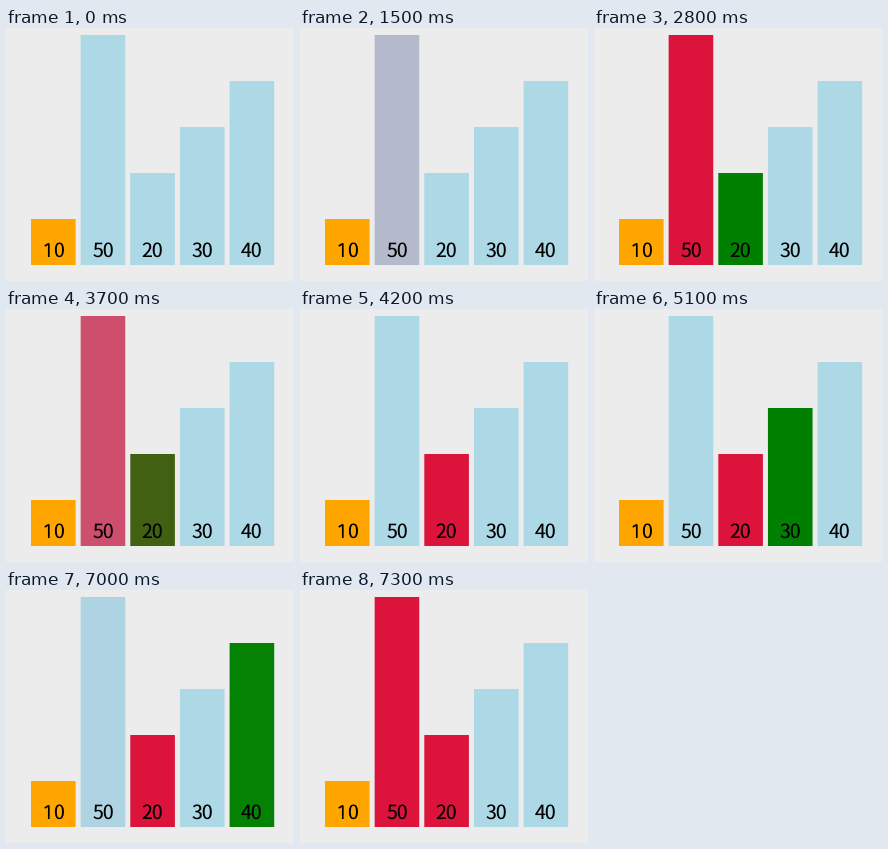
A matplotlib script for the animation above (8 s loop, 288 px wide and 253 px high).

```python
import matplotlib.pyplot as plt
import numpy as np
from matplotlib.animation import FuncAnimation
from matplotlib.colors import to_rgb
from matplotlib.patches import Rectangle

W, H, DPI = 288, 253, 64
STEP_MS, LOOP_MS, FADE_MS = 100, 8000, 300
BASE, PITCH, BAR_W, LEFT = 237, 49.65, 44.6, 25
VALUES = [10, 50, 20, 30, 40]

IDLE, SORTED, MIN, SCAN = "lightblue", "orange", "crimson", "green"
START = [SORTED, IDLE, IDLE, IDLE, IDLE]

# (start in ms, bar, new colour)
CHANGES = [
    (1460, 1, MIN),
    (2510, 2, SCAN),
    (3640, 1, IDLE), (3640, 2, MIN),
    (4735, 3, SCAN),
    (5770, 3, IDLE), (5770, 4, SCAN),
    (6990, 1, MIN), (6990, 4, IDLE),
]

# Cubic Bezier timing curve (0.25, 0.1, 0.25, 1)
u = np.linspace(0, 1, 201)
EASE_X = 0.75 * u * (1 - u) ** 2 + 0.75 * u**2 * (1 - u) + u**3
EASE_Y = 0.3 * u * (1 - u) ** 2 + 3 * u**2 * (1 - u) + u**3


def ease(x):
    return np.interp(x, EASE_X, EASE_Y)


def bar_colors(ms):
    colors = [np.array(to_rgb(c)) for c in START]
    for start, bar, name in CHANGES:
        k = ease((ms - start) / FADE_MS)
        colors[bar] = colors[bar] * (1 - k) + np.array(to_rgb(name)) * k
    return colors


plt.rcParams["text.hinting"] = "none"
fig = plt.figure(figsize=(W / DPI, H / DPI), dpi=DPI, facecolor="#ececec")
ax = fig.add_axes([0, 0, 1, 1])
ax.set_xlim(0, W)
ax.set_ylim(H, 0)
ax.axis("off")


def label(x, text):
    ax.text(x, 229, text, ha="center", va="baseline", color="black",
            family="Noto Sans CJK JP", fontsize=19.5 * 72 / DPI)


bars = []
for i, value in enumerate(VALUES):
    x, h = LEFT + i * PITCH, value * 4.6
    bar = Rectangle((x, BASE - h), BAR_W, h, linewidth=0, snap=False)
    bars.append(ax.add_patch(bar))
    mid = x + BAR_W / 2
    if value == 10:
        # Plain "1" without a foot
        ax.plot([mid - 8.6, mid - 4.5, mid - 4.5], [218, 215.6, 229],
                color="black", lw=1.7 * 72 / DPI, snap=False,
                solid_capstyle="butt", solid_joinstyle="miter")
        label(mid + 5.4, "0")
    else:
        label(mid, str(value))


def draw(frame):
    for bar, color in zip(bars, bar_colors(frame * STEP_MS)):
        bar.set_facecolor(color)
    return bars


anim = FuncAnimation(fig, draw, frames=LOOP_MS // STEP_MS, interval=STEP_MS,
                     repeat=True, repeat_delay=0)
plt.show()
```
